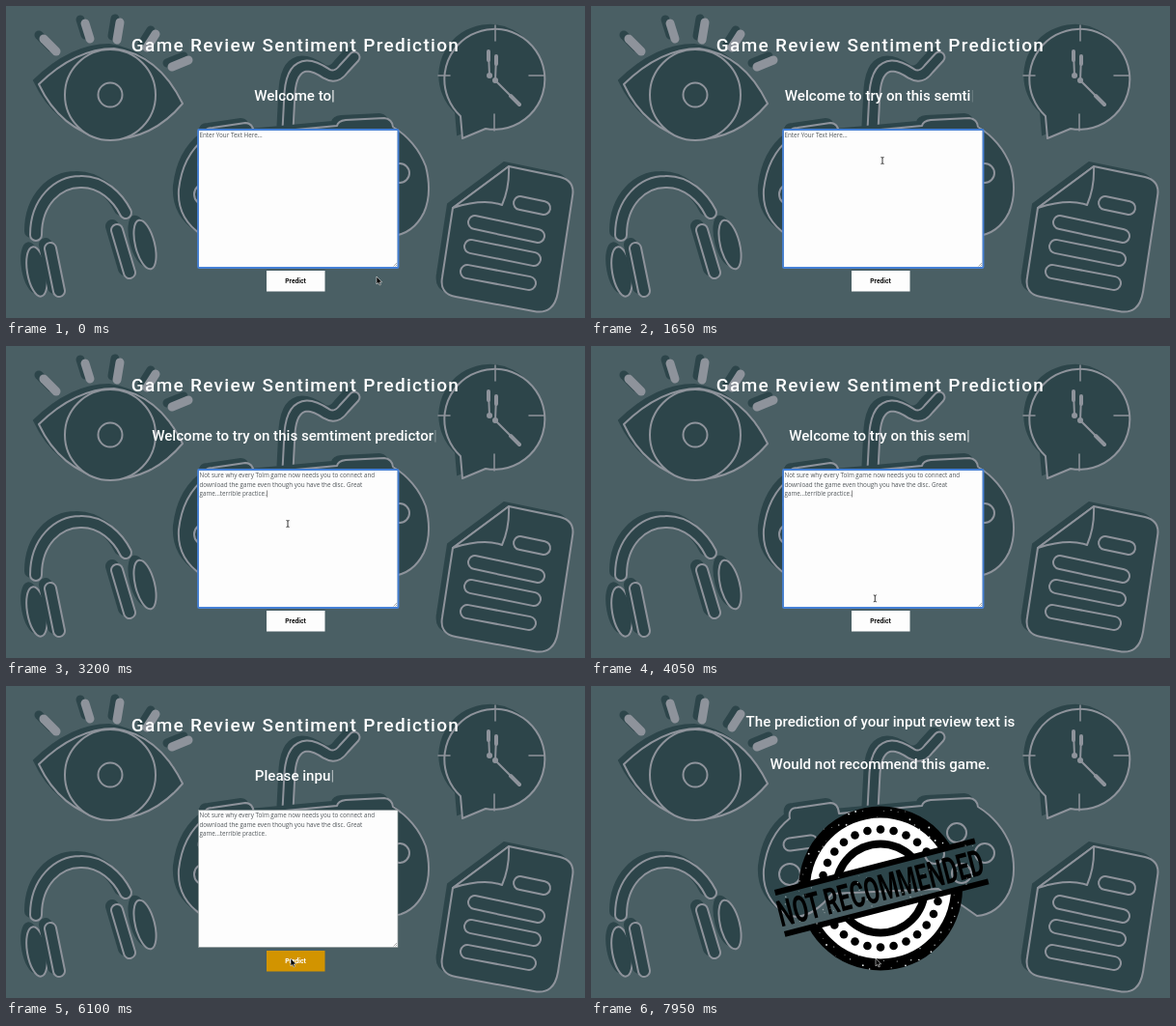
An HTML page for the animation above (8.6 s loop, 600 by 323 pixels).

```html
<!DOCTYPE html>
<html lang="en">
<head>
<meta charset="utf-8">
<title>Game Review Sentiment Prediction</title>
<style>
html, body { margin: 0; width: 100%; height: 100%; overflow: hidden; background: #4a5f64; }
svg { display: block; width: 100vw; height: 100vh; }
text { font: 500 15.1px Roboto, "Open Sans", sans-serif; fill: #fff; white-space: pre; }
.mid { text-anchor: middle; }
.small { font: 6.3px "Open Sans", Roboto, sans-serif; fill: #50565a; }
.line { fill: #2d454a; stroke: #8e939b; stroke-width: 2; stroke-linejoin: round; }
.shade { fill: #2d454a; stroke: #2d454a; stroke-width: 2; }
.tube { fill: none; stroke-linecap: round; stroke-linejoin: round; }
</style>
</head>
<body>
<svg viewBox="0 0 600 323">
  <defs>
    <mask id="gap">
      <rect x="-120" y="-120" width="240" height="240" fill="#fff"/>
      <rect x="-110" y="-24" width="220" height="46" transform="rotate(-14.5)"/>
    </mask>
  </defs>
  <rect width="600" height="323" fill="#4a5f64"/>
  <g id="art"></g>

  <g id="form">
    <text class="mid" x="300" y="47" style="font-size:19px;letter-spacing:1.3px">Game Review Sentiment Prediction</text>
    <text class="mid" x="299" y="98"><tspan id="typed"></tspan><tspan id="bar">|</tspan></text>
    <rect x="199.5" y="128.5" width="206.5" height="142" fill="#fdfdfd" stroke="#8d9799" stroke-width=".7"/>
    <rect id="ring" x="199" y="128" width="207.5" height="143" rx="1" fill="none" stroke="#4580d6" stroke-width="1.8"/>
    <path d="M401.5 269.5l3.5-3.5M403.5 269.5l1.5-1.5" stroke="#777" stroke-width=".6"/>
    <text id="hint" class="small" x="200.5" y="136">Enter Your Text Here...</text>
    <g id="review">
      <text class="small" x="200.5" y="136">Not sure why every Tolm game now needs you to connect and</text>
      <text class="small" x="200.5" y="145.5">download the game even though you have the disc. Great</text>
      <text class="small" x="200.5" y="155">game...terrible practice.</text>
    </g>
    <rect id="caret" width=".5" height="7" fill="#222"/>
    <rect id="button" x="270" y="274" width="60.5" height="21.5"/>
    <text id="label" class="mid" x="300" y="287" style="font-size:6.7px;font-weight:700">Predict</text>
  </g>

  <g id="result">
    <text class="mid" x="300" y="42">The prediction of your input review text is</text>
    <text class="mid" x="299.5" y="86">Would not recommend this game.</text>
    <g id="stamp" transform="translate(300 209.5)"></g>
  </g>

  <g id="mouse" stroke-linejoin="round">
    <path id="arrow" d="M0 0V8L1.8 6.4L3.1 9L4.4 8.4L3.2 5.9H5.6Z" fill="#000" stroke="#eee" stroke-width=".6"/>
    <path id="beam" d="M-1.5-3.5Q0-3.5 0-2.5Q0-3.5 1.5-3.5M0-2.5V2.5M-1.5 3.5Q0 3.5 0 2.5Q0 3.5 1.5 3.5" fill="none" stroke="#222" stroke-width=".9"/>
    <path id="hand" d="M-1 0Q0-1 .6 0V2.5L3 3Q4.5 3.5 4 5L3 7.5H-1L-3.2 4.5Q-2.7 3.3-1 4.5Z" fill="#fff" stroke="#111" stroke-width=".7"/>
  </g>
</svg>
<script>
const $ = id => document.getElementById(id);
const LOOP = 8600, PASTE = 2050, CLICK = 5300, RESULT = 6300;

// Background icons: outlined shapes and tubes over an offset shadow
const shift = 'transform="translate(-5 -4)"';
const shape = d => `<path class="shade" d="${d}" ${shift}/><path class="line" d="${d}"/>`;
const stroke = (d, w, color, extra = '') =>
  `<path class="tube" d="${d}" stroke="${color}" stroke-width="${w}" ${extra}/>`;
const outline = (d, w) => stroke(d, w, '#8e939b') + stroke(d, w - 4, '#2d454a');
const tube = (d, w) => stroke(d, w, '#2d454a', shift) + outline(d, w);
const bar = d => stroke(d, 9, '#2d454a', shift) + stroke(d, 9, '#8e939b');
const circle = (x, y, r) => `<circle class="line" cx="${x}" cy="${y}" r="${r}"/>`;
const cup = (x, y, angle) => {
  const ellipse = (cls, move) =>
    `<g ${move}><ellipse class="${cls}" rx="10" ry="26" transform="translate(${x} ${y}) rotate(${angle})"/></g>`;
  return ellipse('shade', shift) + ellipse('line', '');
};

$('art').innerHTML = [
  // eye
  shape('M34 81Q72 44 112 44Q158 50 183 101Q150 140 103 138Q56 128 34 81Z'),
  circle(108, 92, 47), circle(108, 92, 12.5),
  ...['M39 34L52 47', 'M82 18L87 34', 'M118 17L115 35', 'M155 29L146 43', 'M189 56L172 63'].map(bar),
  // headphones
  tube('M31 237C31 202 54 182 77 182C99 181 116 198 124 214', 14),
  cup(32, 275, -10), cup(144, 247, -14),
  tube('M46 251L55 295', 14), tube('M115 232L128 276', 14),
  // gamepad
  tube('M292 128L294 90Q296 63 312 62Q320 62 332 70Q342 76 350 65L361 53', 13),
  shape('M206 137Q204 126 214 126L248 121Q256 121 257 132L343 124Q344 119 352 118L392 116Q400 117 401 125' +
    'Q425 140 435 166Q442 194 433 214Q422 236 400 238L360 210L250 215Q225 245 203 237Q177 220 179 190Q183 155 206 137Z'),
  outline('M206 164L228 161', 15), circle(206, 195, 11),
  circle(379, 152, 10), circle(408, 173, 10), circle(384, 194, 10), circle(356, 174, 10),
  // clock
  shape('M473 137L471 114A52 52 0 1 1 497 127Z'),
  stroke('M507 20V36M506 112V129M448 72H460M542 72H558', 1.5, '#8e939b'),
  stroke('M501 72L500 47M507 77L508 52M507 77L532 102', 2, '#8e939b'),
  stroke('M500 47V56M508 52V60M523 93L532 102', 4, '#8e939b'),
  stroke('M501 72h.1M507 77h.1', 6, '#8e939b'),
  // document
  shape('M521 166L574 177Q590 181 587 197L572 296Q568 320 547 316L466 301Q449 298 452 281L463 209Z'),
  '<path class="line" d="M521 166L463 209Q495 199 514 206Q522 188 521 166Z"/>',
  ...['M533 204L557 209', 'M486 224L551 238', 'M482 249L547 262', 'M478 275L542 287'].map(d => outline(d, 16))
].join('');

// Rubber stamp
let seed = 7;
const random = () => (seed = seed * 16807 % 2147483647) / 2147483647;
const disc = (r, fill, x = 0, y = 0) => `<circle cx="${x}" cy="${y}" r="${r}" fill="${fill}"/>`;
const around = (n, draw) => Array.from({ length: n }, (_, i) => draw(i / n * 2 * Math.PI)).join('');
const speck = a => {
  const r = 73 + random() * 12;
  return disc(.3 + random() * .7, '#dfe3e3', r * Math.cos(a), r * Math.sin(a));
};
$('stamp').innerHTML = `
  <g mask="url(#gap)">
    ${disc(85, '#000')}${disc(73, '#fff')}
    ${around(28, a => disc(4.3, '#000', 61 * Math.cos(a), 61 * Math.sin(a)))}
    ${disc(50, '#000')}${disc(42, '#fff')}${around(70, speck)}
  </g>
  <g transform="rotate(-14.5)">
    <path d="M-107-26H107V-20H-107ZM-108 18H110V24H-108Z"/>
    <text class="mid" transform="translate(0 13) scale(.6 1)" style="font-size:38px;font-weight:700;fill:#000">NOT RECOMMENDED</text>
    ${Array.from({ length: 40 }, () =>
      disc(.3 + random() * .5, '#9aa5a7', random() * 210 - 105, random() * 44 - 22)).join('')}
  </g>`;

const clamp = v => Math.max(0, Math.min(1, v));
const track = (keys, t, ease = p => p) => {
  const i = keys.findIndex(k => k[0] > t);
  if (i < 0) return keys[keys.length - 1].slice(1);
  if (!i) return keys[0].slice(1);
  const a = keys[i - 1], b = keys[i], p = ease((t - a[0]) / (b[0] - a[0]));
  return a.slice(1).map((v, j) => v + (b[j + 1] - v) * p);
};
const smooth = p => p * p * (3 - 2 * p);

const WELCOME = 'Welcome to try on this semtiment predictor', PLEASE = 'Please input your review';
const welcomeKeys = [[0, 10], [900, 19], [1850, 31], [2250, 35], [2750, 42], [3400, 42], [4540, 14], [5050, 0]];
const pleaseKeys = [[5050, 0], [6100, 11]];
const mouseKeys = [[100, 384, 280], [900, 302, 160], [2850, 302, 160], [3200, 292, 184], [3400, 292, 194], [4350, 295, 282]];

const show = (id, on) => $(id).setAttribute('visibility', on ? 'inherit' : 'hidden');
const set = (id, attrs) => Object.entries(attrs).forEach(([k, v]) => $(id).setAttribute(k, v));

function render(t) {
  const done = t >= RESULT;
  show('form', !done);
  show('result', done);
  set('stamp', { opacity: clamp((t - RESULT) / 750) });

  const [word, keys] = t < 5050 ? [WELCOME, welcomeKeys] : [PLEASE, pleaseKeys];
  $('typed').textContent = word.slice(0, Math.floor(track(keys, t)[0] + .001));
  const phase = (Math.min(t, 6100) + 40) % 700;
  set('bar', { 'fill-opacity': Math.abs(1 - phase / 350) });

  const pasted = t >= PASTE;
  show('hint', !pasted);
  show('review', pasted);
  set('caret', { x: pasted ? 270.5 : 200.3, y: pasted ? 149.5 : 130.5 });
  show('caret', !done && t < CLICK && (t - PASTE + 4000) % 1000 < 500);
  set('ring', { opacity: 1 - clamp((t - CLICK + 100) / 200) });

  const [x, y] = track(mouseKeys, t, smooth);
  const hover = y > 274 && Math.abs(x - 300) < 30;
  const inside = y > 128 && y < 271 && x > 199 && x < 407;
  const hand = hover && t < CLICK;
  set('button', { fill: hover ? '#d29400' : '#fdfdfd' });
  $('label').style.fill = hover ? '#fff' : '#111';
  set('mouse', { transform: `translate(${x} ${y})` });
  show('beam', inside);
  show('hand', hand);
  show('arrow', !inside && !hand);
}

const start = performance.now();
function tick() {
  render((performance.now() - start) % LOOP);
  requestAnimationFrame(tick);
}
tick();
</script>
</body>
</html>
```
